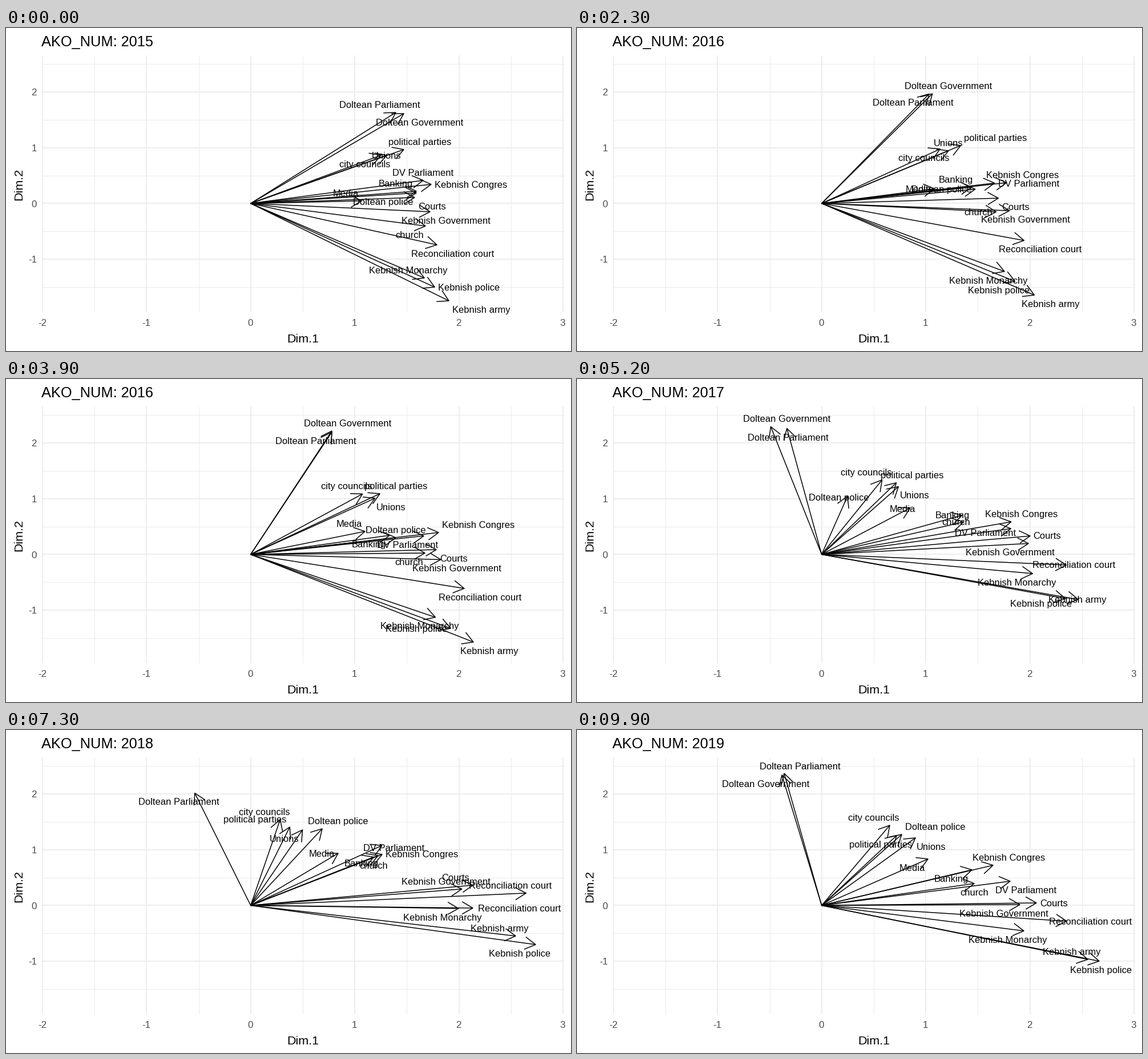
Recreate the animation shown at these times as a matplotlib script. Size 990 by 566 pixels, loop 10 s.

```python
import numpy as np
import matplotlib.pyplot as plt
from matplotlib.animation import FuncAnimation
from matplotlib.collections import LineCollection

W, H, DPI = 990, 566, 100
FRAMES, INTERVAL = 100, 100
PX = 72 / DPI
ORIGIN = np.array([428.7, 307.4])
STEP = np.array([182.4, 97.6])
LEFT, RIGHT, TOP, BOTTOM = 63, 978, 48, 498
HEAD, SPREAD = 21.7, np.radians(30)

KEYS = [0, 39, 63, 73, 87, 99]        # turns of a full path
FEW_KEYS = [0, 39, 63, 87, 99]        # turns of a plain path
SIDE_KEYS = [0, 23, 39, 63, 73, 87, 99]
YEAR_TURNS = 21 + 25 * np.arange(4)

plt.rcParams["font.family"] = "Liberation Sans"
fig = plt.figure(figsize=(W / DPI, H / DPI), dpi=DPI, facecolor="white")
ax = fig.add_axes([0, 0, 1, 1])
ax.set(xlim=(0, W), ylim=(H, 0))
ax.axis("off")


def write(x, y, s, size, color="black", ha="center", **kw):
    return ax.text(x, y, s, fontsize=size * PX, color=color, ha=ha,
                   va="baseline", **kw)


def rule(xs, ys, width):
    ax.plot(xs, ys, color="#EBEBEB", lw=width * PX, zorder=1,
            solid_capstyle="butt")


def draw_grid():
    for v in np.arange(-2, 3.1, 0.5):
        x, major = ORIGIN[0] + v * STEP[0], v == int(v)
        rule([x, x], [TOP, BOTTOM], 1.8 if major else 1)
        if major:
            write(x - 0.5, 522, f"{v:.0f}", 17, "#4D4D4D")
    for v in np.arange(-1.5, 2.6, 0.5):
        y, major = ORIGIN[1] - v * STEP[1], v == int(v)
        rule([LEFT, RIGHT], [y, y], 1.8 if major else 1)
        if major:
            write(54, y + 6.3, f"{v:.0f}", 17, "#4D4D4D", ha="right")
    write(520.5, 551, "Dim.1", 21.5)
    write(28.5, 273.5, "Dim.2", 21.5, rotation=90, rotation_mode="anchor")


def pace(n):
    """Linear time with a slow start and a short rest around the big swing."""
    return np.interp(n, [0, 39, 45, 60, 63, 99], [0, 39, 42, 63, 63, 99])


def smooth(u):
    return u * u * (3 - 2 * u)


def blend(t, keys, points):
    return np.array([np.interp(t, keys, c) for c in np.transpose(points)])


def path(*points):
    keys = KEYS if len(points) == len(KEYS) else FEW_KEYS
    return lambda t: blend(t, keys, points)


def beside(lead, start, end):
    """Follow another path at an offset that drifts from start to end."""
    start, end = np.array(start), np.array(end)
    return lambda t: lead(t) + start + (end - start) * smooth(t / 99)


def nudge(side, half):
    """Label offset for a compass side; a doubled E or W clears the tip."""
    east = side.count("E") - side.count("W")
    reach = half + 6 if abs(east) > 1 else 28
    return (np.sign(east) * reach,
            15 * side.count("S") - 14 * side.count("N"))


def arrow(tip):
    dx, dy = ORIGIN - tip
    a = np.arctan2(dy, dx)
    barbs = [tip + HEAD * np.array([np.cos(a + s), np.sin(a + s)])
             for s in (-SPREAD, SPREAD)]
    return [np.array([ORIGIN, tip]), np.array([barbs[0], tip, barbs[1]])]


class Vector:
    """An arrow from the origin with a label beside its tip."""

    def __init__(self, name, tip, sides, hidden=(), alias=None, swapped=()):
        self.name, self.tip, self.hidden = name, tip, hidden
        self.alias, self.swapped = alias, swapped
        self.text = write(0, 0, name, 16.55, zorder=4)
        half = self.text.get_window_extent().width / 2
        self.nudges = [nudge(s, half) for s in sides.split()]

    def update(self, n):
        """Place the label and return the strokes to draw."""
        shown = n not in self.hidden
        self.text.set_visible(shown)
        if not shown:
            return []
        t = pace(n)
        tip = self.tip(t)
        x, y = tip + blend(t, SIDE_KEYS, self.nudges)
        self.text.set_text(self.alias if n in self.swapped else self.name)
        half = self.text.get_window_extent().width / 2
        x = np.clip(x, LEFT + 7 + half, RIGHT - 6 - half)
        y = max(y, TOP + 15)
        self.text.set_position((x, y + 5.9))
        return arrow(tip)


draw_grid()
title = write(62.5, 32, "", 25.4, ha="left")

parties = path((697, 213), (655, 201), (476, 165), (527, 177), (560, 185))
courts = path((716, 297), (754, 299), (829, 254), (803, 297), (805, 303))
army = path((776, 478), (819, 461), (930, 321), (893, 361), (910, 393),
            (895, 402))

vectors = [
    Vector("Doltean Parliament",
           path((683, 148), (571, 93), (190, 81), (528, 152), (363, 76)),
           "NW SW SW SE SW NEE NE"),
    Vector("Doltean Government",
           path((697, 150), (571, 91), (137, 77), (818, 312), (527, 155),
                (359, 79)),
           "SE NE NE NE EE SEE SW",
           alias="Reconciliation court", swapped=range(69, 82)),
    Vector("political parties", parties, "NE NEE NE NE NWW SWW SW"),
    Vector("Unions", beside(parties, (-30, 10), (33, 4)),
           "O N SE SE SWW SE SE"),
    Vector("city councils", beside(parties, (-40, 10), (-12, -18)),
           "SW SW NW NW NW NWW NW"),
    Vector("DV Parliament",
           path((731, 267), (732, 275), (785, 251), (652, 220), (761, 304),
                (759, 265)),
           "N EE SW WW NE NW SE"),
    Vector("Kebnish Congres",
           path((745, 274), (758, 269), (763, 234), (513, 158), (729, 237)),
           "EE NE NEE NW SEE SWW NE"),
    Vector("Banking",
           path((719, 286), (672, 274), (677, 208), (634, 232), (692, 245)),
           "NWW NW SWW N SWW SW SWW"),
    Vector("Media",
           path((623, 303), (629, 267), (544, 190), (582, 216), (727, 274),
                (615, 226)),
           "NW WW NW S WW NE SW"),
    Vector("Doltean police",
           path((719, 289), (683, 278), (291, 142), (554, 173), (616, 215),
                (569, 183)),
           "SWW WW N SW NE NW NEE"),
    Vector("Courts", courts, "SEE SEE SEE NE NWW NEE EE"),
    Vector("Kebnish Government", beside(courts, (27, 25), (-29, 3)),
           "SE SE SE SWW NW SE SW"),
    Vector("church",
           path((735, 347), (734, 305), (628, 203), (667, 250), (696, 269)),
           "SW WW SW N S SE S"),
    Vector("Reconciliation court",
           path((755, 380), (803, 367), (905, 290), (920, 280), (858, 335)),
           "SE SE SE N NW N EE", hidden=range(82, 93)),
    Vector("Kebnish Monarchy", beside(army, (-43, -40), (-112, -50)),
           "NW SW SW SW SW NEE SW"),
    Vector("Kebnish police",
           path((751, 454), (779, 437), (923, 339), (928, 376), (722, 286),
                (915, 405)),
           "EE SW WW SW SW WW SE"),
    Vector("Kebnish army", army, "SEE SE SE NW NW NE NW"),
]

strokes = LineCollection([], colors="black", linewidths=1.5 * PX, zorder=3)
ax.add_collection(strokes, autolim=False)


def update(n):
    year = 2015 + np.searchsorted(YEAR_TURNS, n, side="right")
    title.set_text(f"AKO_NUM: {year}")
    strokes.set_segments([s for v in vectors for s in v.update(n)])
    return [title, strokes, *(v.text for v in vectors)]


anim = FuncAnimation(fig, update, frames=FRAMES, interval=INTERVAL,
                     repeat=True, repeat_delay=0, blit=False)
plt.show()
```
